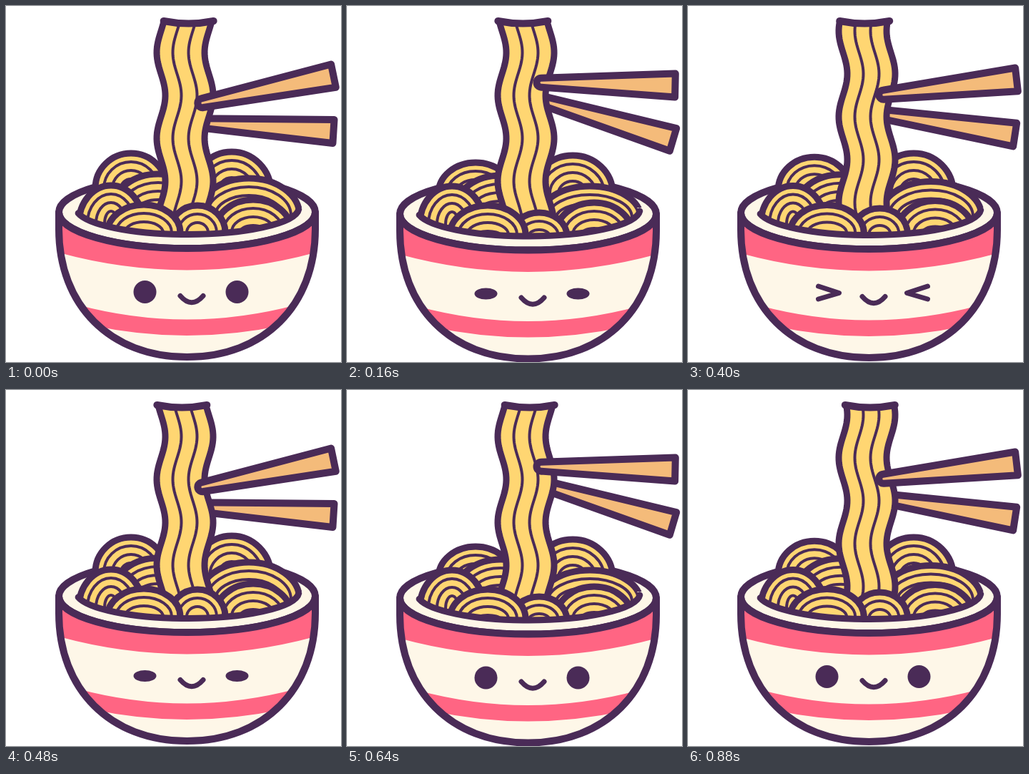
These frames come from a looping animation (469 by 498 pixels, 960 ms). An HTML page with a canvas:

```html
<!DOCTYPE html>
<html lang="en">
<head>
<meta charset="utf-8">
<title>Noodle bowl</title>
<style>
  html, body { margin: 0; width: 100%; height: 100%; overflow: hidden; background: #fff; }
  canvas { display: block; }
</style>
</head>
<body>
<canvas id="stage" width="469" height="498"></canvas>
<script>
const ctx = document.getElementById('stage').getContext('2d');
const INK = '#4a2b57', NOODLE = '#ffd672', PINK = '#ff6583', CREAM = '#fef7e8', WOOD = '#f4bb7a';
const STEP = 80, STEPS = 12, BAND = 12;
const LIFT = [0, 0.4, 1, 1.4, 1, 0.4];
// Eye height per step; 0 means squeezed shut.
const EYES = [16, 12, 8, 0, 0, 0, 8, 12, 16, 16, 16, 16];

// Mounds: cx, cy, rx, ry when the sticks are closed, then the change as they open.
const BACK = [
  [175, 255, 50, 49, 5, 7, 2, -6],
  [213, 282, 62, 47, 2, 0, 0, -2],
  [316, 260, 55, 56, 0, 2, 1, -3],
  [340, 293, 71, 52, 0, 3, 0, -8]
];
const FRONT = [
  [147, 304, 45, 53, 0, 1, 0, 0],
  [346, 316, 54, 45, 0, 4, 0, 0],
  [268, 317, 39, 38, 1, 5, 0, -5],
  [193, 317, 51, 39, 4, 3, 2, 2]
];

function paint(path, fill, width) {
  if (fill) { ctx.fillStyle = fill; ctx.fill(path); }
  if (width) { ctx.lineWidth = width; ctx.strokeStyle = INK; ctx.stroke(path); }
}

function oval(x, y, rx, ry, from = 0, to = Math.PI * 2) {
  const p = new Path2D();
  p.ellipse(x, y, rx, ry, 0, from, to);
  return p;
}

// Every ring is one noodle thick, so the rings shrink by a constant band.
function mound(m, s) {
  const [x, y, rx, ry] = [0, 1, 2, 3].map(i => m[i] + m[i + 4] * s);
  paint(oval(x, y, rx, ry), NOODLE, 9);
  for (let d = BAND; d < Math.min(rx, ry) - 4; d += BAND) paint(oval(x, y, rx - d, ry - d), null, 4);
}

function strand(phase) {
  const sway = y => -6 * Math.cos(2 * Math.PI * ((y - 65) / 120 + phase / 4));
  const wave = (p, x, from, to) => {
    const d = Math.sign(to - from) * 4;
    for (let y = from; (to - y) * d >= 0; y += d) p.lineTo(x + sway(y), y);
    return p;
  };
  paint(wave(wave(new Path2D(), 217, 22, 302), 284, 302, 22), NOODLE, 0);
  for (const x of [239.5, 261.5]) paint(wave(new Path2D(), x, 26, 302), null, 4);
  for (const x of [217, 284]) paint(wave(new Path2D(), x, 22, 302), null, 9);
  const mid = 251 + sway(18), cap = new Path2D();
  cap.moveTo(mid - 35, 21);
  cap.quadraticCurveTo(mid, 28, mid + 35, 21);
  paint(cap, null, 10);
}

function stick(x, y, deg, start) {
  ctx.save();
  ctx.translate(x, y);
  ctx.rotate(deg * Math.PI / 180);
  const p = new Path2D(), end = start + 194;
  p.arc(start + 6.5, 0, 6.5, Math.PI / 2, Math.PI * 1.5);
  p.lineTo(end, -16.5);
  p.lineTo(end, 16.5);
  p.closePath();
  paint(p, WOOD, 10);
  ctx.restore();
}

function pile(s, phase) {
  ctx.save();
  const clip = new Path2D('M0 0H469V282H0Z');
  clip.ellipse(254, 282.5 + 2.5 * s, 156, 37, 0, 0, Math.PI);
  ctx.clip(clip);
  BACK.forEach(m => mound(m, s));
  strand(phase);
  FRONT.forEach(m => mound(m, s));
  ctx.restore();
}

function bowl() {
  const shape = new Path2D('M74 288.5V312C74 419 146 491 253.5 491S433 419 433 312V288.5A179.5 50.5 0 0 1 74 288.5Z');
  paint(shape, CREAM, 0);
  ctx.save();
  ctx.clip(shape);
  paint(new Path2D('M70 280H437V344Q253 395 70 344Z'), PINK, 0);
  paint(new Path2D('M100 418Q253 459 407 418L390 446Q253 476 117 446Z'), PINK, 0);
  ctx.restore();
  paint(shape, null, 10);
}

function face(ry) {
  for (const [x, dir] of [[194.5, 1], [323.5, -1]]) {
    if (ry) paint(oval(x, 400, 16, ry), INK, 0);
    else paint(new Path2D(`M${x - 12 * dir} 391L${x + 17 * dir} 400.5L${x - 12 * dir} 409`), null, 7);
  }
  paint(new Path2D('M244 405.5Q260 424 276 405.5'), null, 7);
}

function draw(n) {
  const s = LIFT[n % 6], drop = 2.5 * s;
  ctx.clearRect(0, 0, 469, 498);
  ctx.lineJoin = ctx.lineCap = 'round';

  stick(458.5 - 2 * s, 175.5 + 11.5 * s, 3.6 + 13 * s, -194);

  ctx.save();
  ctx.translate(0, drop);
  paint(oval(253.5, 288.5, 179.5, 50.5), CREAM, 10);
  ctx.restore();

  pile(s, n % 4);

  ctx.save();
  ctx.translate(0, drop);
  paint(oval(254, 282.5, 156, 37, 0.05, Math.PI - 0.2), null, 9);
  bowl();
  face(EYES[n]);
  ctx.restore();

  stick(268.5 - 3 * s, 137 - 30 * s, -11.7 + 12.9 * s, 0);
}

const begin = performance.now();
function tick() {
  draw(Math.floor((performance.now() - begin) / STEP) % STEPS);
  requestAnimationFrame(tick);
}
tick();
</script>
</body>
</html>
```
